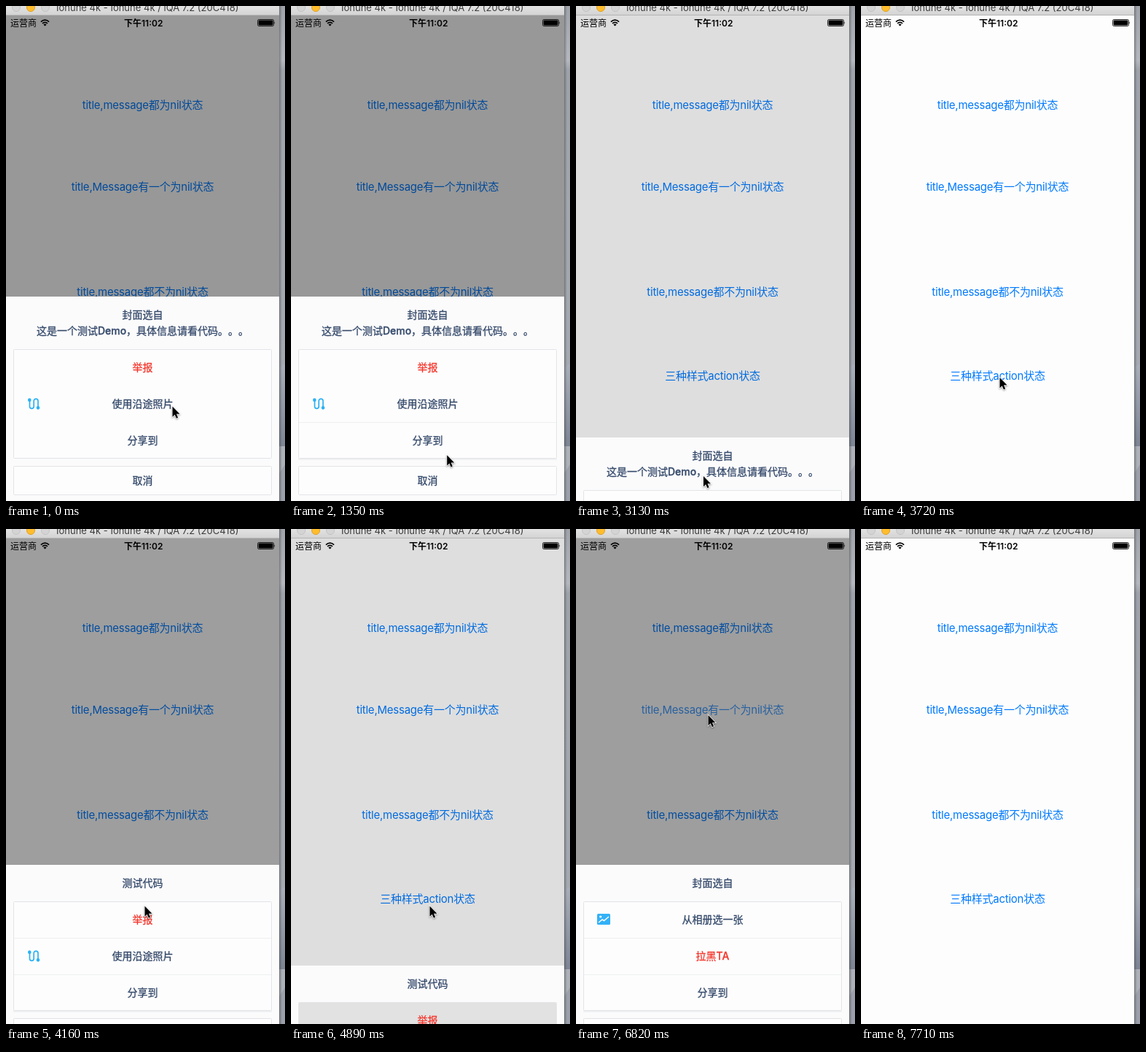
Animation of 383 by 678 pixels, one loop 8430 ms. Source, as an HTML page:

```html
<!DOCTYPE html>
<html lang="zh-CN">
<head>
<meta charset="utf-8">
<title>Action sheets</title>
<style>
  html, body { margin: 0; width: 100%; height: 100%; overflow: hidden; }
  svg { display: block; width: 383px; height: 678px; }
  text {
    font-family: Inter, "Noto Sans CJK SC", "Noto Sans CJK", sans-serif;
    text-spacing-trim: space-all; font-feature-settings: "chws" 0;
  }
  .mid { text-anchor: middle; }
  .link { font-size: 15px; letter-spacing: -.24px; fill: #007aff; }
  .label { font-size: 14px; font-weight: 500; fill: #34496a; stroke: #34496a; stroke-width: .3px; }
  .danger { fill: #f4382f; stroke: #f4382f; }
  .status { font-size: 12px; fill: #000; }
  .card { fill: #fdfdfd; stroke: #e2e4e7; }
  .line { stroke: #eeeff1; }
</style>
</head>
<body>
<svg viewBox="0 0 383 678">
  <defs>
    <linearGradient id="bar" x2="0" y2="1">
      <stop stop-color="#e2e2e2"/><stop offset="1" stop-color="#d3d3d3"/>
    </linearGradient>
    <linearGradient id="sky" x2="0" y2="1">
      <stop stop-color="#9fa3aa"/><stop offset=".11" stop-color="#b5b8be"/>
      <stop offset=".13" stop-color="#9da2ab"/><stop offset=".4" stop-color="#a3a7af"/>
      <stop offset=".72" stop-color="#a4a9b2"/>
    </linearGradient>
    <linearGradient id="hill" x2="0" y2="1">
      <stop stop-color="#a9afba"/><stop offset="1" stop-color="#7d8595"/>
    </linearGradient>
    <linearGradient id="edge">
      <stop stop-color="#444" stop-opacity=".5"/><stop offset="1" stop-color="#444" stop-opacity="0"/>
    </linearGradient>
  </defs>

  <rect x="375" width="8" height="678" fill="url(#sky)"/>
  <path d="M375 495Q379 493 383 490V604H375Z" fill="url(#hill)"/>
  <path d="M375 603H383V678H375Z" fill="#adb1b9"/>
  <path d="M375 640L383 628V678H375Z" fill="#9ba0aa"/>
  <rect x="375" width="4" height="678" fill="url(#edge)"/>

  <rect y="13" width="375" height="665" fill="#fdfdfd"/>
  <g id="links"></g>
  <rect id="dim" y="13" width="375" height="665"/>

  <rect width="375" height="12.5" fill="url(#bar)"/>
  <path d="M0 12.5H375" stroke="#b5b5b5"/>
  <g fill="#d4d4d4" stroke="#c3c3c3">
    <circle cx="14" cy="2" r="5.5"/>
    <circle cx="34" cy="2" r="5.5" fill="#ffbd2e" stroke="#dfa023"/>
    <circle cx="54" cy="2" r="5.5"/>
  </g>
  <text x="69" y="7" font-size="13" fill="#3c3c3c">Iohune 4k - Iohune 4k / iQA 7.2 (20C418)</text>

  <text class="status" x="6" y="27.5">运营商</text>
  <g fill="none" stroke="#000" stroke-width="1.7">
    <path d="M47.9 21.6Q53.5 16.6 59.1 21.6M50 23.8Q53.5 20.8 57 23.8"/>
    <path d="M53.5 27.6L51.4 25.4Q53.5 23.8 55.6 25.4Z" fill="#000" stroke="none"/>
  </g>
  <text class="status mid" x="188.7" y="27.5" font-weight="600">下午11:02</text>
  <rect x="345.5" y="18.5" width="22" height="9" rx="1.8" fill="none" stroke="#000" stroke-width=".8"/>
  <rect x="346.6" y="19.6" width="19.8" height="6.8" rx=".8"/>
  <path d="M368.5 21.3Q370 23 368.5 24.7Z"/>

  <g id="sheets"></g>
  <path id="cursor" d="M0 0V14.2L3.2 11.2 5.4 16.2 7.6 15.2 5.5 10.3H10Z" stroke="#fff"
        stroke-width="1.4" paint-order="stroke" style="filter:drop-shadow(0 1px 1px #0006)"/>
</svg>

<script>
const LOOP = 8430, STEP = 148.1, BOTTOM = 678, DIM = 0.4;
const $ = id => document.getElementById(id);
const text = (y, str, cls) => `<text class="mid ${cls}" x="187.5" y="${y}">${str}</text>`;
const card = (y, h) =>
  `<rect class="card" x="10.5" y="${y + .5}" width="354" height="${h - 1}" rx="1"/>`;

const icons = {
  route: `<g fill="none" stroke="#2db1f4" stroke-width="1.7">
    <path d="M32.5 -5V4A2.9 2.9 0 0 0 38.2 4V-4A2.9 2.9 0 0 1 44 -4V5"/>
    <circle cx="32.3" cy="-5.3" r="1.5" fill="#2db1f4"/><circle cx="44" cy="5.3" r="1.5" fill="#2db1f4"/></g>`,
  photo: `<rect x="29" y="-8" width="18" height="15" rx="1.5" fill="#33b1f7"/>
    <path d="M31 4L36 0 38.5 1.5 45 -4" fill="none" stroke="#fff" stroke-width="1.5"/>
    <circle cx="33.7" cy="-4" r="1.6" fill="#fff"/>`
};
const report = { name: '举报', danger: true };
const route = { name: '使用沿途照片', icon: 'route' };
const share = { name: '分享到' };

// Keys are [step, ...values]; values between keys are linear. Sheets use [step, slide, dim].
const sheets = [
  { title: '封面选自', message: '这是一个测试Demo，具体信息请看代码。。。',
    rows: [report, route, share], press: [20, 21], pressed: 3,
    shown: [[0, 1, 1], [20, 1, 1], [21, .31, .3], [22, 0, 0]] },
  { title: '测试代码', rows: [report, route, share], press: [32, 33], pressed: 0,
    shown: [[26, 0, 0], [27, .4, .5], [28, .845, .94], [29, .98, 1], [30, 1, 1],
      [32, 1, 1], [33, .31, .3], [34, 0, 0]] },
  { title: '封面选自', rows: [{ name: '从相册选一张', icon: 'photo' }, { name: '拉黑TA', danger: true }, share],
    shown: [[44, 0, 0], [45, .4, .5], [46, .845, .94], [47, .98, 1], [48, 1, 1],
      [49, 1, 1], [50, .31, .3], [51, 0, 0]] }
];
const cursorPath = [
  [0, 228.5, 548.5], [1, 238, 556], [3, 244, 580], [5, 220.5, 604], [6, 220.5, 604], [7, 219, 604],
  [8, 219, 604], [13, 195, 660], [15, 195, 660], [16, 183.5, 656.5], [18, 175, 644], [22, 175, 644],
  [25, 190.5, 509], [26, 190.5, 509], [27, 190.5, 516.5], [34, 190.5, 516.5], [35, 207, 331],
  [36, 207, 331], [40, 188, 267], [41, 188, 267], [43, 181.5, 255]
];

function sample(keys, step) {
  const next = keys.findIndex(k => k[0] > step);
  if (next < 0) return keys.at(-1).slice(1);
  if (next === 0) return keys[0].slice(1);
  const a = keys[next - 1], b = keys[next], u = (step - a[0]) / (b[0] - a[0]);
  return a.slice(1).map((v, i) => v + (b[i + 1] - v) * u);
}

function buildSheet(sheet) {
  const top = sheet.message ? 72 : 50, body = sheet.rows.length * 50;
  const cancel = top + body + 10;
  sheet.height = cancel + 48;
  const pressY = sheet.pressed === 3 ? cancel : top + 50 * sheet.pressed;
  const rows = sheet.rows.map((row, i) => {
    const y = top + 25 + i * 50;
    return (i ? `<path class="line" d="M11 ${y - 24.5}H364"/>` : '') +
      text(y + 5.2, row.name, row.danger ? 'label danger' : 'label') +
      (row.icon ? `<g transform="translate(0 ${y})">${icons[row.icon]}</g>` : '');
  }).join('');
  return `<g><rect width="375" height="${sheet.height}" fill="#fbfbfc"/>
    ${text(30.2, sheet.title, 'label')}${sheet.message ? text(51.7, sheet.message, 'label') : ''}
    <path class="line" d="M10 ${top + body + .8}H365" stroke-width="2"/>
    ${card(top, body)}${card(cancel, 40)}
    ${sheet.press ? `<rect class="press" x="11" y="${pressY + 1}" width="353"
      height="${sheet.pressed === 3 ? 38 : 49}" fill="#e2e2e2"/>` : ''}
    ${rows}${text(cancel + 25.2, '取消', 'label')}</g>`;
}

$('links').innerHTML = [
  [140.5, 'title,message都为nil状态'], [252.5, 'title,Message有一个为nil状态'],
  [396.5, 'title,message都不为nil状态'], [511.5, '三种样式action状态']
].map(([y, str]) => text(y, str, 'link')).join('');
$('sheets').innerHTML = sheets.map(buildSheet).join('');
sheets.forEach((sheet, i) => {
  sheet.node = $('sheets').children[i];
  sheet.pressNode = sheet.node.querySelector('.press');
});
const firstLines = sheets[0].node.querySelectorAll('.line');

function draw(now) {
  const step = Math.floor(now % LOOP / STEP);
  let dim = 0;
  for (const s of sheets) {
    const [slide, shade] = sample(s.shown, step);
    s.node.setAttribute('transform', `translate(0 ${Math.round(BOTTOM - s.height * slide)})`);
    s.node.style.display = slide ? '' : 'none';
    if (s.press) s.pressNode.style.opacity = step >= s.press[0] && step <= s.press[1] ? 1 : 0;
    dim = Math.max(dim, shade);
  }
  firstLines.forEach((line, i) => line.style.opacity = step >= 9 && i !== 1 ? 1 : 0);
  $('dim').style.opacity = dim * DIM;
  $('links').children[1].style.opacity = step === 45 || step === 46 ? .75 : 1;
  const [x, y] = sample(cursorPath, step);
  $('cursor').setAttribute('transform', `translate(${x} ${y})`);
  $('cursor').style.display = step < 52 ? '' : 'none';
  requestAnimationFrame(draw);
}
requestAnimationFrame(draw);
</script>
</body>
</html>
```
